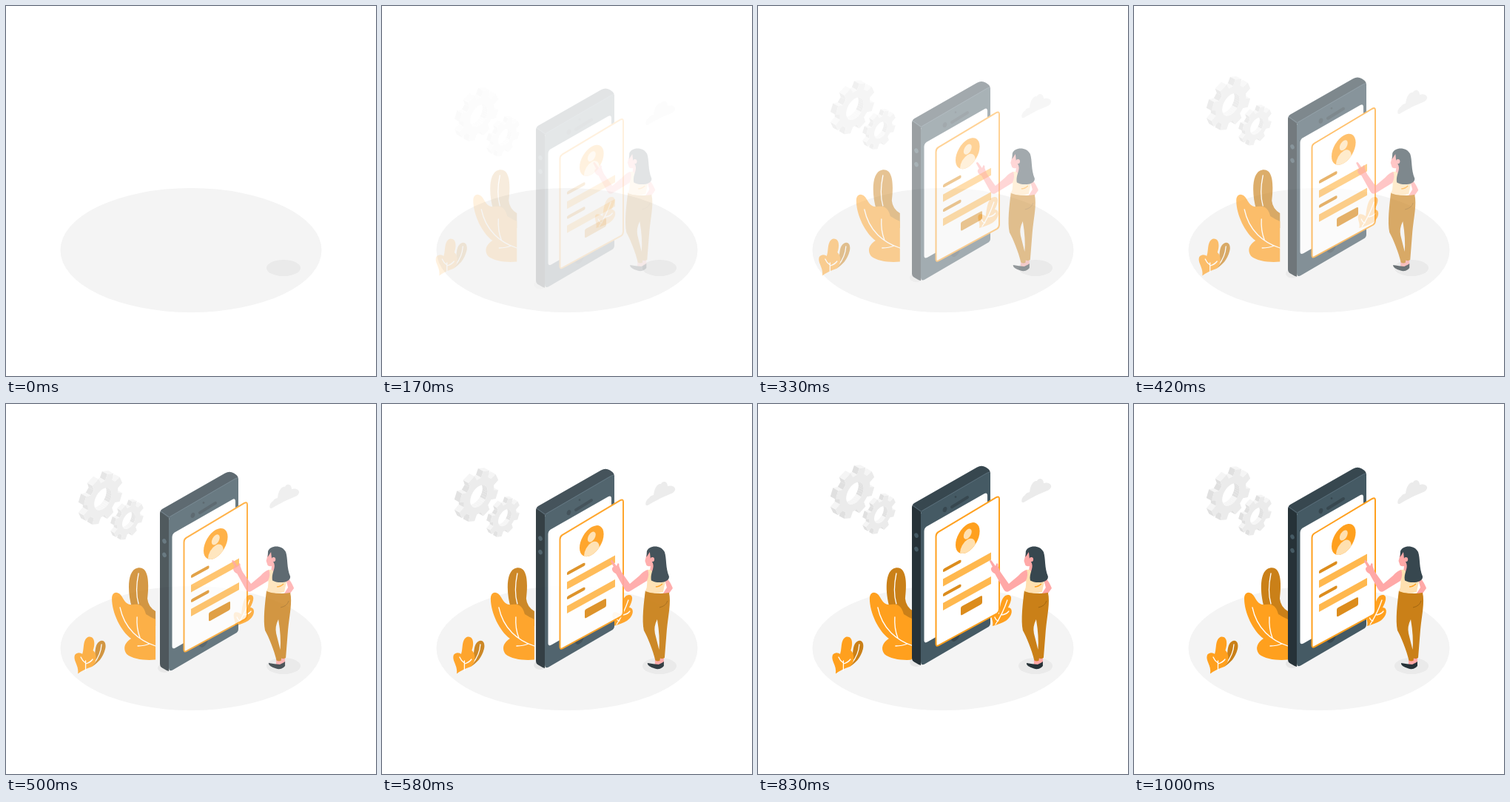
Animation, 500 px wide and 500 px high, one loop 1.04 s. Source, as an HTML page:

```html
<!DOCTYPE html>
<html lang="en">
<head>
<meta charset="utf-8">
<title>Profile form illustration</title>
<style>
html, body { margin: 0; width: 100%; height: 100%; overflow: hidden; background: #fff; }
svg { display: block; width: 100vw; height: 100vh; }
.main { fill: #ffa01e; }
.mid { fill: #ca8018; }
.button { fill: #dc8c1c; }
.pale { fill: #ffb84e; }
.cream { fill: #ffe0b0; }
.skin { fill: #ffa8a7; }
.ink { fill: #263238; }
.slate { fill: #37474f; }
.steel { fill: #455a64; }
.vein { fill: none; stroke: #fff; stroke-width: 1.3; stroke-linecap: round; }
</style>
</head>
<body>
<svg viewBox="0 0 500 500">
  <defs>
    <clipPath id="disc"><circle r="18.8"/></clipPath>
  </defs>

  <ellipse cx="250" cy="330" rx="176.5" ry="84" fill="#f4f4f4"/>
  <ellipse cx="375" cy="354" rx="23" ry="11" fill="#eaeaea"/>

  <g class="rise" id="gears"></g>

  <g class="rise">
    <path fill="#ebebeb" d="M357 135C355 133 357 127 361 125Q362 122 367 121C368 112 372 105 377 106C379 101 386 102 386 109C392 107 399 111 395 116C393 120 386 119 359 135Z"/>
  </g>

  <!-- leaves -->
  <g class="slide">
    <path class="mid" d="M176 275C170 255 169 224 184 221.5C200 219 199 245 197 263Q198 274 208 280V300H188Z"/>
    <path class="vein" d="M185 229Q180 253 185 270"/>
    <path class="main" d="M149 263C149 253 158 252 163 261C167 268 170 272 178 271C189 269 193 276 195 284Q201 288 208 291V345.500C195 347 177 345 169 338C163 330 167 322 175 317C161 307 149 282 149 263Z"/>
    <path class="vein" d="M160 275C166 304 186 320 208 327M183 288Q182 303 187 316M184 327Q193 327 200 324"/>
  </g>
  <g class="slide">
    <path class="mid" d="M122 355C129 345 123 327 132 321C138 317 142 323 140 331C137 343 130 350 122 355Z"/>
    <path class="vein" d="M125 350Q134 339 135 325"/>
    <path class="main" d="M103 364.500C105 353 96 347 99 339C102 335 107 336 109 338C112 331 109 317 118 314.500C127 314 126 326 123.500 333C129 337 129 350 122 355Q110 359 103 364.500Z"/>
    <path class="vein" d="M113.500 360V347M107 342Q109 347 113.500 350M114 351Q120 349 123 345"/>
  </g>
  <g class="slide">
    <path class="main" d="M315 300C317 293 312 289 314 283C316 279 322 283 324 284C325 274 327 258 336 258C343 258 340 268 336 275C343 275 343 286 333 293Q326 297 315 300Z"/>
    <path class="vein" d="M319 298Q329 283 335 265M318 288Q320 293 323 293M328 285Q334 284 337 280"/>
  </g>

  <!-- phone and card fade as one -->
  <g class="rise">
    <ellipse cx="214" cy="351" rx="9" ry="6" fill="#e6e6e6"/>
    <path class="ink" d="M208 142Q208 138 211 138L220 146V355L217 354L211 350.500Q208 348.500 208 345Z"/>
    <path class="slate" d="M208.500 139.500Q209 137 211 136L296 87.500Q302 84 308 87.500L311.500 90Q314 92 314 97L221 149Z"/>
    <path class="steel" d="M220 151Q220 147 224 144.500L308 95.500Q314 92.500 314 98V298Q314 302 310 304L226 353Q220 356.500 220 350Z"/>
    <path fill="none" stroke="#647884" stroke-width=".7" d="M209 139L220.500 147L309 95.500Q313 93 313.500 95"/>
    <path fill="#fff" d="M224.500 174Q224.500 169.500 228 167.500L306 123Q310 121 310 126V273Q310 277 307 279L229 323.500Q224.500 326 224.500 321Z"/>
    <path d="M262 141L283 128" stroke="#37474f" stroke-width="4" stroke-linecap="round"/>
    <ellipse class="slate" cx="252.500" cy="144.500" rx="2.700" ry="3.700" transform="rotate(20 252.500 144.500)"/>
    <circle class="slate" cx="267" cy="127.500" r="1.300"/>
    <circle class="slate" r="7" transform="matrix(.866 -.5 0 1 267 315)"/>
    <g class="steel">
      <ellipse cx="214" cy="179.500" rx="2.600" ry="3.400" transform="rotate(-25 214 179.500)"/>
      <ellipse cx="214" cy="198" rx="2.600" ry="3.400" transform="rotate(-25 214 198)"/>
    </g>

    <path fill="#fff" stroke="#ffa01e" stroke-width="2" d="M240.500 181Q240.500 177 243.500 175L322 128Q326 126 326 130V279Q326 283 323 285L244 328Q240.500 330 240.500 326Z"/>
    <g transform="matrix(.866 -.5 0 1 283.300 183)">
      <circle class="main" r="18.800"/>
      <g class="cream" clip-path="url(#disc)">
        <circle cy="-5.500" r="6.300"/>
        <ellipse cy="14.500" rx="12" ry="12.500"/>
      </g>
    </g>
    <g class="button">
      <path d="M250 226.500Q250 225 252 224L272 213Q274.500 212 274.500 213.500V215Q274.500 216 273 217L252 228.500Q250 229.500 250 228Z"/>
      <path d="M250 259.500Q250 258 252 257L272 246Q274.500 245 274.500 246.500V248Q274.500 249 273 250L252 261.500Q250 262.500 250 261Z"/>
      <path d="M274 278Q274 276 276 275L301 261.500Q303 260.500 303 262.500V270Q303 272 301 273L276 287Q274 288 274 286Z"/>
    </g>
    <path class="pale" d="M250 238.500L315 202.500V212.500L250 248.500ZM250 271L315 235V245L250 281Z"/>
  </g>

  <!-- woman -->
  <g class="slide">
    <path class="skin" d="M383 233C390 236 394 246 395 249L388.500 258L382 256L387 248Z"/>
    <path class="skin" d="M371 342H383V350L379 354H371Z"/>
    <path class="ink" d="M361 350Q369 351.500 376 352L381 349.500L383 348V354L381 356Q376 359.500 371 357.500Q360 354 361 350Z"/>
    <path class="mid" fill-rule="evenodd" d="M358 252Q373 258 390 255C393 268 389 285 387 305L384 343Q381 345 378 343.500L377.500 347Q374 348 371.500 346.500C368 332 361 315 356 306C353 292 356 268 358 252ZM374 291Q369 301 371 310L376.500 332Q378 315 374 291Z"/>
    <path fill="none" stroke="#9a6010" stroke-width=".8" d="M377 275Q386 273 388 266"/>
    <path class="skin" d="M362 198L359 206L357.500 212L359.500 218Q362 220 365 219L364 227L378 234L375 200Z"/>
    <path class="cream" d="M358 226Q361 223 365 224Q369 229 374 229L385 240L382 254Q370 258 358 253Q363 243 358 226Z"/>
    <path fill="none" stroke="#ffa01e" stroke-width="1.400" d="M372 247Q377 247 381 243"/>
    <path class="slate" d="M360 199C363 190.500 379 190 384 200C387 209 385 221 390 233C391 242 373 243 366 238.500C364 229 371 222 368 215L365 209L364 200L359.500 207Z"/>
    <ellipse class="skin" cx="367.500" cy="210" rx="2.700" ry="3.100"/>
    <path class="skin" d="M361 224Q355 226 350 232L337 243L325 226L317.500 228L330 250.500Q333 256 338 252.500L360 239Q364 230 361 224Z"/>
    <path class="skin" d="M317.500 229C312 226 312 221 315 220L311 212.500Q312 210 314 212L319 219L320.500 215.500Q323 214.500 322.500 219L325.500 227Z"/>
  </g>
</svg>
<script>
const LOOP = 1040, FRAME = 1000 / 24, LEAD = 32, TRAVEL = 30;
const rise = document.querySelectorAll('.rise');
const slide = document.querySelectorAll('.slide');

const polar = (r, a) => [r * Math.cos(a), r * Math.sin(a)];

function toothRing(outer, root) {
  const pts = [];
  for (let i = 0; i < 8; i++) {
    for (const [r, a] of [[root, -.25], [outer, -.17], [outer, .17], [root, .25]]) {
      pts.push(polar(r, (i + .5) * Math.PI / 4 + a));
    }
  }
  return pts;
}

// Hole runs the other way round so that its walls face inwards
function holeRing(r) {
  return Array.from({ length: 32 }, (_, i) => polar(r, -i * Math.PI / 16));
}

const outline = pts => 'M' + pts.map(p => p.map(v => v.toFixed(2)).join(' ')).join('L') + 'Z';

// Isometric gear: lit walls seen from the upper left, then the front face
function gear(x, y, size, depth) {
  const back = [-depth, -depth * .55];
  const project = ([u, v]) => [x + u * .866, y - u * .5 + v];
  const shift = p => [p[0] + back[0], p[1] + back[1]];
  const rings = [toothRing(size, size * .76), holeRing(size * .44)];
  const walls = [];
  for (const ring of rings) {
    ring.forEach((a, i) => {
      const b = ring[(i + 1) % ring.length];
      const p = project(a), q = project(b);
      const facing = (q[1] - p[1]) * back[0] - (q[0] - p[0]) * back[1];
      if (facing <= 0) return;
      const nx = b[1] - a[1], ny = a[0] - b[0];
      walls.push({
        near: (p[0] + q[0]) * back[0] + (p[1] + q[1]) * back[1],
        d: outline([p, q, shift(q), shift(p)]),
        fill: ny < nx ? '#f5f5f5' : '#e0e0e0'
      });
    });
  }
  walls.sort((a, b) => a.near - b.near);
  const sides = walls.map(w => `<path d="${w.d}" fill="${w.fill}"/>`).join('');
  const face = rings.map(r => outline(r.map(project))).join('');
  return `${sides}<path d="${face}" fill="#ebebeb" fill-rule="evenodd"/>`;
}

document.getElementById('gears').innerHTML = gear(131, 122.5, 31, 7) + gear(166, 151.5, 23.5, 5);

const bez = (s, a, b) => 3 * (1 - s) * (1 - s) * s * a + 3 * (1 - s) * s * s * b + s * s * s;

// Ease that overshoots and settles
function ease(x) {
  if (x <= 0) return 0;
  if (x >= 1) return 1;
  let lo = 0, hi = 1;
  for (let i = 0; i < 30; i++) {
    const m = (lo + hi) / 2;
    if (bez(m, .36, .5) < x) lo = m; else hi = m;
  }
  return bez(lo, -.01, 1.38);
}

function place(list, move, alpha) {
  for (const el of list) {
    el.setAttribute('transform', `translate(${move})`);
    el.setAttribute('opacity', alpha);
  }
}

function draw(time) {
  const step = Math.floor((time % LOOP + 5) / FRAME);
  const p = step < 2 ? 0 : ease((step * FRAME + LEAD) / 1000);
  const off = TRAVEL * (1 - p);
  const alpha = Math.min(1, Math.max(0, p));
  place(rise, `0 ${off.toFixed(2)}`, alpha);
  place(slide, `${(-off).toFixed(2)} 0`, alpha);
}

const start = performance.now();
function tick() {
  draw(performance.now() - start);
  requestAnimationFrame(tick);
}
tick();
</script>
</body>
</html>
```
